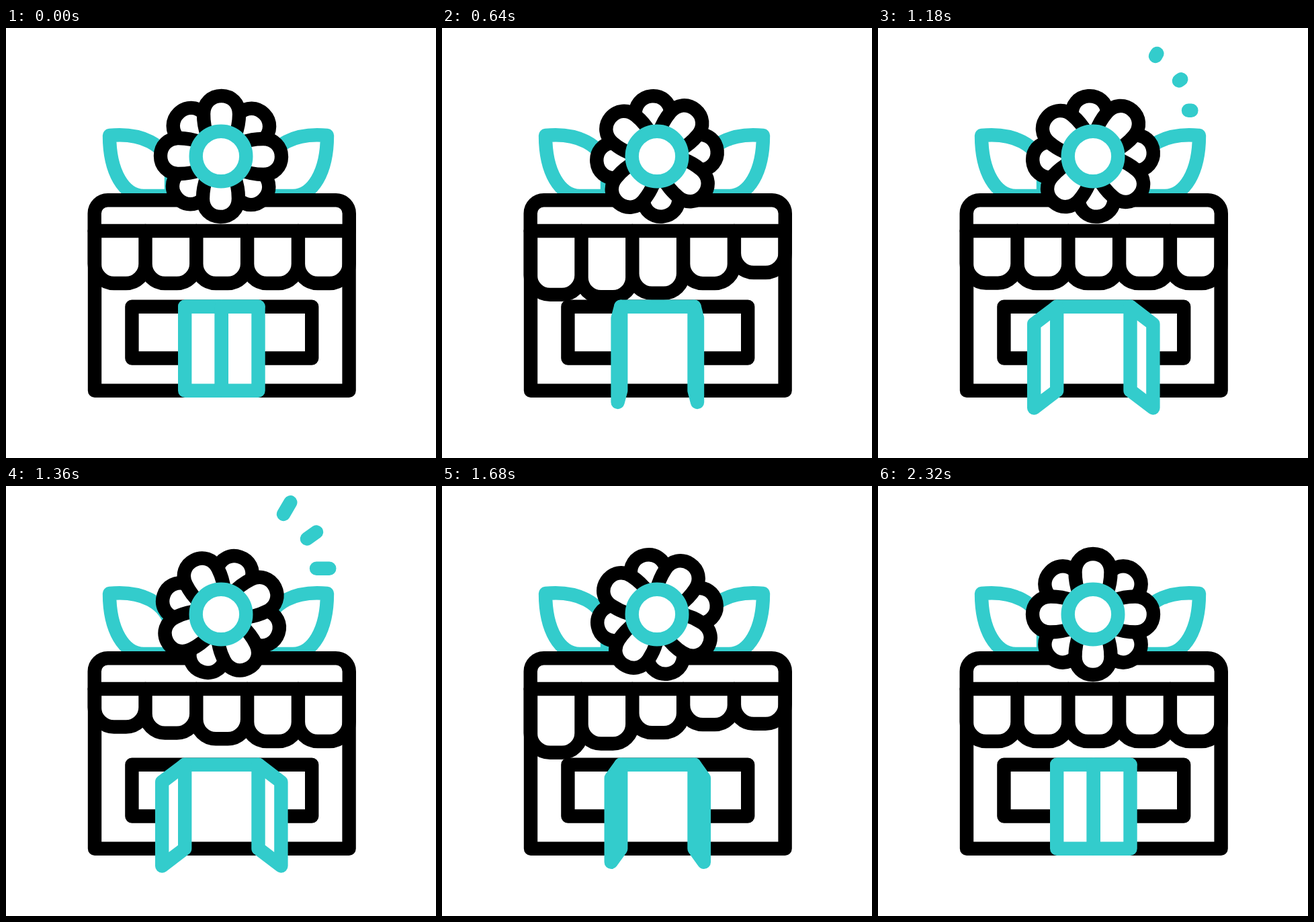
An HTML page that plays this animation: 640x640 px, repeating every 2400 ms.

```html
<!DOCTYPE html>
<html lang="en">
<head>
<meta charset="utf-8">
<title>Flower shop</title>
<style>
  html, body { margin: 0; width: 100%; height: 100%; overflow: hidden; background: #fff; }
  svg { display: block; width: 100vw; height: 100vh; }
  .ink { stroke: #000; }
  .teal { stroke: #3cc; }
  .solid { fill: #fff; }
</style>
</head>
<body>
<svg viewBox="0 0 640 640" fill="none" stroke-width="20.4" stroke-linejoin="round" stroke-linecap="round">
  <defs>
    <path id="leaf" d="M154 160C200 155.5 238 172 246 210V250H205C176 250 154 215 154 160Z"/>
    <path id="petal" d="M320 191C300 172 293.5 148 293.5 128C293.5 112 305 101 320 101S346.5 112 346.5 128C346.5 148 340 172 320 191Z"/>
  </defs>
  <g class="teal solid">
    <use href="#leaf"/>
    <use href="#leaf" transform="matrix(-1 0 0 1 632 0)"/>
  </g>
  <g class="ink">
    <path d="M131.7 302V276A19.7 19.7 0 0 1 151.4 256.3H491.1A19.7 19.7 0 0 1 510.8 276V302"/>
    <rect x="187.4" y="414.7" width="267.8" height="76.8"/>
    <path d="M266 414.7H375.5V539.7H266Z" fill="#fff" stroke="none"/>
    <rect x="132" y="302" width="378.6" height="237.7"/>
    <path id="awning"/>
  </g>
  <g class="teal">
    <path d="M266.2 414.7H375.5"/>
    <path id="doorL" class="solid"/>
    <path id="doorR" class="solid"/>
    <path id="sparks"/>
  </g>
  <g id="flower" class="ink solid"></g>
  <circle class="teal solid" cx="320" cy="191" r="37.3"/>
</svg>
<script>
const LOOP = 2400, HALF = 1160;
const $ = id => document.getElementById(id);
const clamp = x => Math.min(1, Math.max(0, x));
const smooth = x => (x = clamp(x), x * x * (3 - 2 * x));
const sine = x => (1 - Math.cos(Math.PI * clamp(x))) / 2;
const mix = (a, b, k) => a + (b - a) * k;

// Diagonal petals lie behind the upright ones.
$('flower').innerHTML = [45, 135, 225, 315, 0, 90, 180, 270]
  .map(a => `<use href="#petal" transform="rotate(${a} 320 191)"/>`).join('');

const flowerAngle = t => 900 * sine((t + 30) / 2040);

// One wave: up, down past rest, back to rest.
function wave(t) {
  const step = 284, levels = [0, -27, 20.2, 0];
  const i = Math.floor(t / step);
  if (t < 0 || i > 2) return 0;
  return mix(levels[i], levels[i + 1], smooth(t / step - i));
}

function awningPath(t) {
  const width = 75.8, r = 29;
  let d = '';
  for (let i = 0; i < 5; i++) {
    const x = 131.7 + i * width, local = t - i * 67;
    const y = 380 + wave(local < HALF ? local : local - HALF);
    d += `M${x} 302V${y - r}A${r} ${r} 0 0 0 ${x + r} ${y}H${x + width - r}` +
         `A${r} ${r} 0 0 0 ${x + width} ${y - r}V302`;
  }
  return d;
}

const swing = x => smooth(1 - (1 - clamp(x)) ** 1.5);
const doorOpen = t => swing((t - 225) / 885) - swing((t - 1501) / 840);

function doorPath(hinge, side, open) {
  const x = 320.8 + side * 88.6 * open, dy = 25.8 * open;
  return `M${hinge} 414.7L${x} ${414.7 + dy}V${539.7 + dy}L${hinge} 539.7Z`;
}

const rays = [[413, 42, 423.3, 24.3], [448, 78.5, 462, 68.5], [462, 122.8, 481.3, 122.8]];
function sparksPath(t) {
  const head = smooth((t - 1110) / 230), tail = smooth((t - 1370) / 230);
  if (head <= tail) return '';
  return rays.map(([x, y, x2, y2]) =>
    `M${mix(x, x2, tail)} ${mix(y, y2, tail)}L${mix(x, x2, head)} ${mix(y, y2, head)}`).join('');
}

function draw(now) {
  const t = now % LOOP, open = doorOpen(t);
  $('flower').setAttribute('transform', `rotate(${flowerAngle(t)} 320 191)`);
  $('awning').setAttribute('d', awningPath(t));
  $('doorL').setAttribute('d', doorPath(266.2, -1, open));
  $('doorR').setAttribute('d', doorPath(375.5, 1, open));
  $('sparks').setAttribute('d', sparksPath(t));
}

const start = performance.now();
function tick() {
  draw(performance.now() - start);
  requestAnimationFrame(tick);
}
tick();
</script>
</body>
</html>
```
